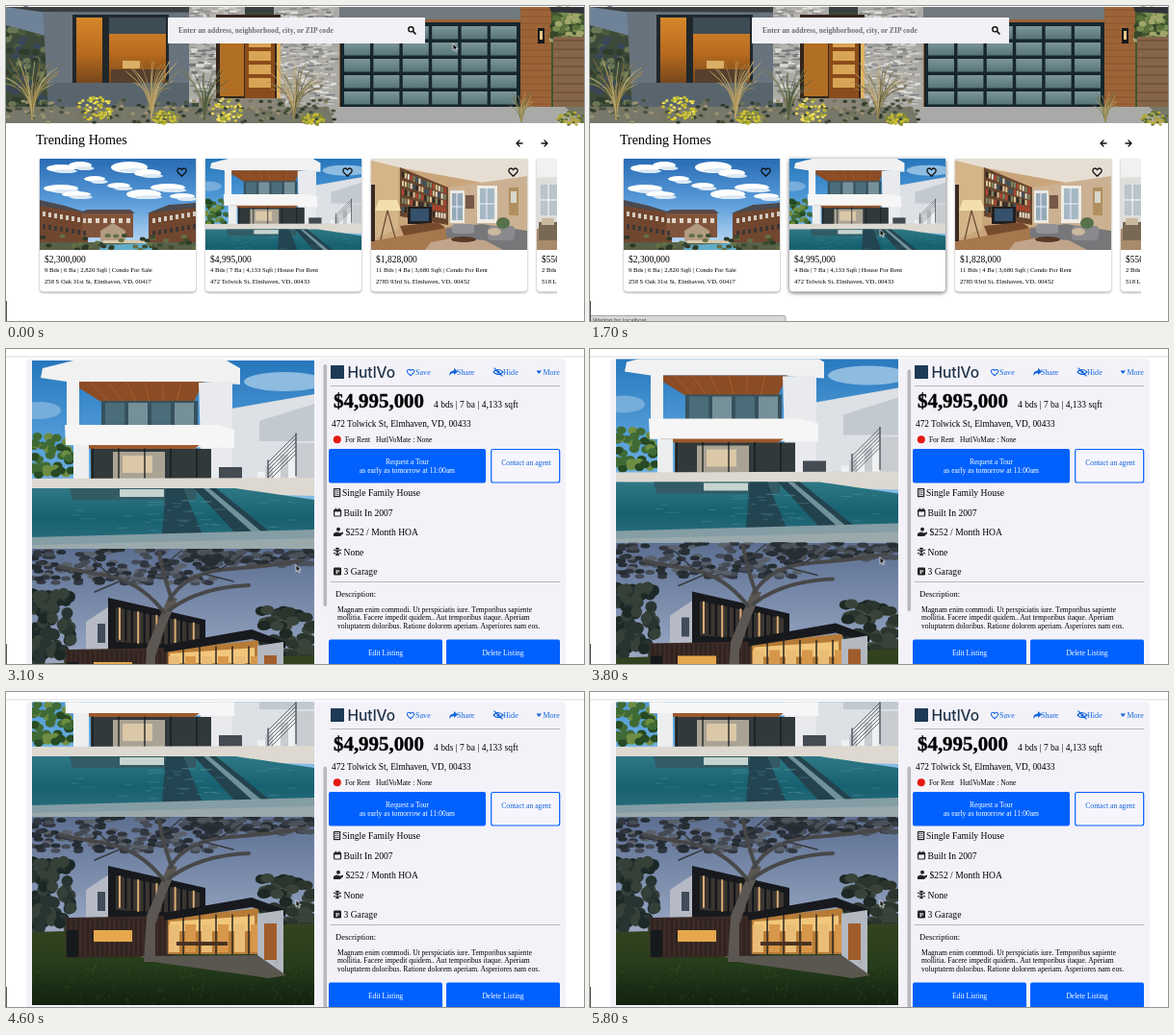
Write an HTML page that moves like this. It is 600 px wide and 328 px high and loops after 5.9 s.

```html
<!DOCTYPE html>
<html lang="en">
<head>
<meta charset="utf-8">
<title>Home listings</title>
<style>
html, body { margin: 0; width: 100%; height: 100%; overflow: hidden; background: #fff; }
svg { display: block; width: 100vw; height: 100vh; font-family: "Liberation Serif", Times, serif; }
.card { filter: drop-shadow(0 1px 1.2px #0006); }
.card.hover { filter: drop-shadow(0 1.5px 2.2px #000a); }
</style>
</head>
<body>
<svg id="stage" viewBox="0 0 600 328"></svg>
<script>
const rect = (x, y, w, h, fill, more = '') =>
  `<rect x="${x}" y="${y}" width="${w}" height="${h}" fill="${fill}" ${more}/>`;
const poly = (points, fill) => `<polygon points="${points}" fill="${fill}"/>`;
const oval = (x, y, rx, ry, fill) => `<ellipse cx="${x}" cy="${y}" rx="${rx}" ry="${ry}" fill="${fill}"/>`;
const line = (d, color, width = 1) =>
  `<path d="${d}" fill="none" stroke="${color}" stroke-width="${width}" stroke-linecap="round" stroke-linejoin="round"/>`;
const text = (x, y, size, s, more = '') => `<text x="${x}" y="${y}" font-size="${size}" ${more}>${s}</text>`;
const at = (x, y, body, scale = 1) => `<g transform="translate(${x} ${y}) scale(${scale})">${body}</g>`;
const many = (n, f) => Array.from({ length: n }, (_, i) => f(i)).join('');
const fade = (id, ...stops) => `<linearGradient id="${id}" x2="0" y2="1">` +
  stops.map((c, i) => `<stop offset="${i / (stops.length - 1)}" stop-color="${c}"/>`).join('') + '</linearGradient>';
const clip = (id, x, y, w, h) => `<clipPath id="${id}">${rect(x, y, w, h, '#000')}</clipPath>`;

let seed = 7;
const rnd = (a, b) => {
  seed = (seed * 16807) % 2147483647;
  return +(a + (b - a) * seed / 2147483647).toFixed(1);
};
const pick = list => list[Math.floor(rnd(0, list.length - 0.06))];

const heart = color => line('M0 4.2L-4 .2C-6.2-3-2.2-5.6 0-2.4 2.2-5.6 6.2-3 4 .2Z', color, 1.3);
const grass = (x, y, h, n, colors) => many(n, () =>
  line(`M${x} ${y}q${rnd(-4, 4)} ${-h / 2} ${rnd(-h / 2, h / 2)} ${-rnd(h / 2, h)}`, pick(colors), 0.7));
const bush = (x, y, w, h, colors) => many(60, () => {
  const a = rnd(0, 6.3), r = Math.sqrt(rnd(0, 1));
  return oval((x + w * r * Math.cos(a)).toFixed(1), (y + h * r * Math.sin(a)).toFixed(1), 1.7, 1.3, pick(colors));
});
const stone = (x, y, w, h) => rect(x, y, w, h, '#aaa9a4') + many(Math.round(w * h / 16), () =>
  rect(rnd(x, x + w - 9), rnd(y, y + h - 3), rnd(4, 9), rnd(1, 2.6), pick(['#c9c8c4', '#8d8d8a', '#dddcd8', '#74777a', '#b8b5ad'])));

function hero() {
  const garage = rect(347, 17, 187, 88, '#17252c') + many(30, i =>
    rect(351 + (i % 6) * 30.4, 21 + Math.floor(i / 6) * 17, 27, 13.5, 'url(#frost)'));
  return rect(0, 1, 600, 121, '#3c4a3a') +
    many(80, () => oval(rnd(0, 42), rnd(3, 110), 4, 3, pick(['#2f3d2c', '#4c5b3f', '#697653', '#38465a']))) +
    poly('0,1 45,1 45,32 0,20', '#6e8397') +
    poly('38,1 192,1 192,108 44,108', '#68737d') + poly('0,1 345,1 345,7 36,6', '#3b3e40') +
    rect(69, 9, 100, 79, '#20272b') +
    rect(73, 12, 27, 72, 'url(#warm)') + rect(107, 12, 59, 72, 'url(#warm)') +
    rect(107, 12, 59, 17, '#3e4c55') + rect(109, 66, 55, 18, '#55402d') + rect(121, 57, 18, 8, '#dcae66') +
    rect(43, 80, 150, 28, '#59656d') + stone(190, 1, 58, 100) + stone(278, 1, 68, 104) +
    rect(218, 9, 67, 87, '#33261c') + rect(222, 12, 25, 82, '#b16f25') + rect(248, 12, 31, 84, '#8a4c1b') +
    many(5, i => rect(252, 19 + i * 14, 23, 10, '#d8a456')) + rect(281, 12, 4, 84, '#e1b366') +
    rect(346, 1, 220, 106, '#9b6337') + many(15, i => line(`M346 ${4 + i * 7}H566`, '#7c4924', 0.6)) +
    rect(346, 1, 188, 13, '#70797e') + garage +
    rect(552, 23, 7, 16, '#16191b') + rect(554, 26, 3, 9, '#e8c98e') +
    rect(566, 1, 34, 121, '#42552e') +
    many(60, () => oval(rnd(567, 600), rnd(2, 35), 4, 3, pick(['#587039', '#344729', '#768c50', '#a0a76b']))) +
    poly('564,1 600,1 600,8 566,6', '#303237') + rect(568, 32, 32, 74, '#856548') +
    many(8, i => line(`M568 ${36 + i * 9}H600`, '#63482f')) +
    poly('0,105 600,105 600,122 0,122', '#777869') + poly('335,105 580,105 600,122 340,122', '#a9aaa8') +
    rect(200, 96, 90, 12, '#8b8478') +
    many(190, () => oval(rnd(0, 345), rnd(98, 121), 2.5, 1.6, pick(['#46513b', '#73745a', '#9a9171', '#303b2e']))) +
    grass(27, 118, 64, 34, ['#b59c5e', '#806f41', '#c8b77a']) +
    grass(151, 116, 60, 28, ['#a88f54', '#c5ae70']) + grass(206, 118, 52, 24, ['#485940', '#827c4e']) +
    grass(299, 119, 60, 36, ['#a38d58', '#665f3b', '#c4b27d']) + grass(535, 120, 30, 20, ['#b19b62', '#76743f']) +
    bush(93, 107, 19, 13, ['#d8c62d', '#aeb02f', '#eedf5c']) + bush(230, 109, 16, 13, ['#d7c62e', '#a3a435', '#eee064']) +
    bush(166, 116, 14, 7, ['#d0c33a', '#8a9334']) + bush(319, 118, 12, 6, ['#c7bb35', '#858c34']) +
    bush(587, 117, 14, 7, ['#596b32', '#b5a843']);
}

// Photo scenes, each drawn from its own top left corner
const condo = () => rect(0, 0, 162, 95, 'url(#sky)') +
  [[22, 10, 15, 4], [42, 7, 12, 4], [93, 9, 19, 6], [112, 15, 14, 4], [57, 21, 11, 3], [22, 31, 18, 4], [38, 37, 15, 3],
   [108, 37, 18, 5], [133, 30, 18, 4], [82, 28, 12, 3], [148, 39, 13, 3]].map(c => oval(...c, '#fff') + oval(c[0] + 5, c[1] + 3, c[2] * .8, 2, '#dce8f4')).join('') +
  poly('0,44 24,50 50,57 50,88 0,95', '#71462f') + poly('162,46 133,51 113,57 113,88 162,95', '#71462f') +
  rect(44, 56, 53, 26, '#80543b') + poly('40,57 49,53 94,53 99,57', '#57494a') +
  poly('0,43 26,49 52,57 0,49', '#4b4a50') + poly('162,46 134,48 111,57 162,51', '#4b4a50') +
  many(8, i => rect(3 + i * 6, 55 + i, 3, 5, '#d3cbc1') + rect(3 + i * 6, 68 + i, 3, 5, '#3d3735')) +
  many(8, i => rect(117 + i * 6, 62 - i, 3, 5, '#d3cbc1') + rect(117 + i * 6, 75 - i, 3, 5, '#3d3735')) +
  many(6, i => rect(50 + i * 8, 62, 4, 5, '#ded5c9')) +
  rect(0, 87, 162, 8, '#586148') + poly('63,75 76,67 89,75 89,86 63,86', '#b29b80') +
  rect(66, 85, 46, 3, '#d8c8ae') + poly('64,90 110,88 119,95 62,95', '#62aeca') +
  many(40, () => oval(rnd(0, 162), rnd(80, 95), 3, 2, pick(['#3d4b2e', '#617044', '#2d3929'])));

const villa = () => rect(0, 0, 293, 196, 'url(#deep)') +
  oval(262, 22, 42, 10, '#8dbce0') + oval(8, 52, 22, 9, '#77addb') +
  many(45, () => oval(rnd(0, 42), rnd(78, 122), 5, 4, pick(['#274a24', '#406a35', '#6e8d42']))) +
  poly('190,53 293,35 293,134 190,134', '#dde0e4') + poly('236,63 293,45 293,84 236,84', '#c2c9d1') +
  poly('11,8 43,0 202,0 216,8 216,25 174,22 36,22 9,18', '#f1f1f2') +
  poly('38,22 178,22 168,43 72,43', '#8c4c25') + many(6, i => line(`M${60 + i * 19} 22L${80 + i * 14} 43`, '#b36b36', 0.6)) +
  rect(36, 20, 13, 68, '#f2f2f3') + rect(72, 42, 100, 29, '#36515d') +
  many(4, i => rect(76 + i * 24, 44, 20, 26, i % 2 ? '#759098' : '#4b6c79')) +
  poly('173,23 208,22 208,132 176,126', '#e8eaed') +
  poly('34,67 191,67 210,72 210,91 35,88', '#f6f6f6') + poly('46,88 174,88 164,95 72,95', '#9c592c') +
  rect(61, 92, 125, 33, '#32393a') + rect(84, 95, 54, 28, '#aaa394') + rect(94, 99, 31, 18, '#dbc8a7') +
  many(5, i => line(`M${63 + i * 27} 92V124`, '#141a1d', 1.3)) + rect(43, 88, 16, 39, '#eceef0') +
  rect(194, 111, 24, 16, '#444b52') + many(8, i => poly(`${218 + i * 8},${128 - i * 6} 293,${128 - i * 6} 293,133 ${218 + i * 8},133`, i % 2 ? '#c8ccd0' : '#eff0f1')) +
  many(6, i => line(`M245 ${106 + i * 4}L274 ${77 + i * 4}`, '#464d55', 0.8)) + line('M245 104V130M274 76V120', '#464d55', 1.3) +
  poly('0,123 293,122 293,141 0,133', '#ddd9d1') +
  poly('0,133 211,133 293,145 293,196 0,196', 'url(#pool)') +
  poly('39,133 171,133 170,145 42,145', '#335b65') + rect(91, 134, 46, 8, '#c5d4cf') +
  poly('139,133 157,133 177,181 134,191', '#234451') + poly('168,133 191,133 254,184 215,184', '#23424d') +
  poly('178,133 184,133 245,184 235,184', '#6f929a') +
  many(35, () => line(`M${rnd(4, 270)} ${rnd(145, 180)}h${rnd(4, 15)}`, '#69a9b170', 0.7)) +
  poly('0,184 293,176 293,196 0,196', '#859da4') + poly('0,192 293,185 293,196 0,196', '#9aa9ac');

const dusk = () => rect(0, 0, 293, 196, 'url(#dusk)') +
  many(180, () => oval(rnd(0, 190), rnd(0, 36), 5, 2.5, pick(['#313640', '#454b55', '#252d32', '#5a606a']))) +
  many(80, () => oval(rnd(160, 293), rnd(0, 17), 6, 3, pick(['#353b43', '#4b515a', '#272e33']))) +
  many(90, () => oval(rnd(0, 42), rnd(45, 125), 6, 6, pick(['#1c2826', '#283431', '#354039']))) +
  many(80, () => oval(rnd(238, 293), rnd(64, 135), 7, 5, pick(['#1d2824', '#2b352e', '#394339']))) +
  poly('0,120 293,111 293,196 0,196', 'url(#lawn)') +
  poly('56,76 80,60 80,108 56,108', '#b5bac5') + rect(68, 78, 8, 20, '#424d5b') +
  poly('79,51 180,74 180,111 79,106', '#17191d') + poly('87,61 174,79 174,101 87,97', '#3b3530') +
  many(13, i => line(`M${91 + i * 6.4} ${62 + i * 1.3}v32`, i % 3 ? '#111419' : '#d9ad77', 2)) +
  poly('35,105 147,103 147,145 35,147', '#3b2a25') + many(22, i => line(`M${38 + i * 5} 106v39`, '#201b1b')) +
  rect(64, 118, 40, 12, '#e6a84d') + rect(36, 118, 12, 28, '#14191b') +
  poly('139,105 235,95 235,143 139,143', '#b67b37') + poly('143,109 231,103 231,119 143,119', '#f1c77b') +
  many(6, i => rect(142 + i * 17, 112, 11, 29, i % 2 ? '#d7974a' : '#e9bd76') + line(`M${140 + i * 17} 102V143`, '#292522', 1.5)) +
  rect(150, 130, 53, 4, '#493223') + poly('137,100 228,84 263,97 263,104 228,94 137,108', '#17191d') +
  poly('234,101 261,97 261,164 234,148', '#b4b8c1') + rect(241, 111, 13, 38, '#a05d2b') +
  poly('112,145 234,144 264,165 246,168 126,151', '#5a5650') +
  poly('116,151 119,103 132,72 142,49 151,52 139,80 128,112 128,151', '#5c5752') +
  line('M137 66Q112 34 78 28T30 19M143 53Q160 24 205 21T280 12M145 52Q135 24 132 4M142 64Q174 40 225 38', '#484849', 4) +
  line('M93 33L65 45M82 29L61 9M193 23L218 7M178 26L209 34M133 21L155 2', '#363b3f', 1.6) +
  many(130, () => line(`M${rnd(0, 293)} ${rnd(151, 195)}l1-2`, '#4b6a2b80', 0.7));

const loft = () => rect(0, 0, 162, 95, '#caa57b') + poly('0,0 162,0 162,19 116,25 28,9 0,2', '#e6ded3') +
  poly('0,2 28,9 28,73 0,85', '#d4b58a') + poly('80,30 162,18 162,75 80,69', '#cbb191') +
  poly('30,9 80,30 80,69 30,60', '#67452e') +
  many(5, r => many(16, i => rect(32 + i * 2.9, 14 + r * 9 + i * (1.1 - r * .16), 2, 5.5, pick(['#b84532', '#d9c594', '#385568', '#7c8b66', '#e7e0cc', '#2c2827'])))) +
  rect(38, 50, 25, 18, '#221f21') + poly('30,70 69,66 76,71 76,83 37,88', '#774b2d') + rect(41, 52, 19, 13, '#35516b') +
  rect(82, 33, 15, 34, '#e9e9e4') + rect(84, 36, 11, 28, '#94a9b7') + rect(110, 28, 21, 39, '#eeece5') + rect(113, 31, 15, 32, '#a6b9c3') +
  line('M89 36V64M120 31V63M84 50H95M113 47H128', '#eef', 1) + rect(98, 38, 9, 14, '#76584a') + rect(143, 30, 10, 29, '#b18f61') + rect(145, 34, 6, 12, '#d8d9cd') +
  poly('0,86 79,72 162,76 162,95 0,95', '#a5784e') + poly('62,87 110,78 146,95 56,95', '#c2a48b') +
  poly('8,43 27,43 31,54 4,54', '#f3dfae') + line('M17 54L10 84M17 54L25 82', '#694b31', 1.2) +
  poly('78,72 115,68 162,75 162,95 137,95 118,85 78,82', '#77777a') + rect(84, 68, 23, 10, '#929195', 'rx="3"') + rect(121, 70, 28, 15, '#8a898d', 'rx="4"') +
  oval(128, 76, 7, 4, '#cab8a0') + oval(96, 84, 13, 3, '#563a29') + oval(137, 67, 7, 6, '#56714b') + rect(0, 27, 4, 59, '#3a2a23');

const bright = () => rect(0, 0, 162, 95, '#dedddb') + poly('0,0 162,0 162,12 0,20', '#f2f1ef') + rect(4, 27, 17, 32, '#b9c5ca') +
  line('M12 27V59M4 43H21', '#fff', 1) + poly('0,73 162,65 162,95 0,95', '#a98b6a') + rect(2, 66, 27, 19, '#776956') + rect(5, 62, 13, 7, '#c9b99d');

const homes = [
  [condo, '$2,300,000', '9 Bds | 6 Ba | 2,820 Sqft | Condo For Sale', '258 S Oak 31st St, Elmhaven, VD, 00417'],
  [villa, '$4,995,000', '4 Bds | 7 Ba | 4,133 Sqft | House For Rent', '472 Tolwick St, Elmhaven, VD, 00433'],
  [loft, '$1,828,000', '11 Bds | 4 Ba | 3,680 Sqft | Condo For Rent', '2785 93rd St, Elmhaven, VD, 00452'],
  [bright, '$550,000', '2 Bds | 1 Ba | 940 Sqft | Condo For Sale', '518 Loder St, Elmhaven, VD, 00468']
];

const card = ([photo, price, facts, address], i) => at(35 + i * 172, 159,
  `<g class="card">${rect(0, 0, 162, 138.5, '#fff', 'rx="4"')}` +
  `<g clip-path="url(#photo)">${at(0, 0, photo(), photo === villa ? 162 / 293 : 1)}</g>` +
  at(147.5, 14, heart('#111')) + text(5, 108, 9.5, price) + text(5, 118, 6.7, facts) + text(5, 129.5, 6.65, address) + '</g>');

const arrow = 'M3 0H-3M0-3L-3 0 0 3';
const home = () => hero() + rect(168, 12, 267, 27, '#f1f0f5') +
  text(179, 28, 7.6, 'Enter an address, neighborhood, city, or ZIP code', 'font-weight="700" fill="#6d6d72"') +
  '<circle cx="420.4" cy="24.3" r="2.6" fill="none" stroke="#111" stroke-width="1.4"/>' + line('M422.5 26.4L425 29', '#111', 1.7) +
  text(31, 143.5, 14.1, 'Trending Homes') +
  at(533, 143, line(arrow, '#111', 1.3)) + at(559, 143, line(arrow, '#111', 1.3), '-1 1') +
  `<g clip-path="url(#row)">${homes.map(card).join('')}</g>` +
  `<g id="status">${rect(-2, 322.5, 205, 12, '#d9d9dc', 'stroke="#a5a5a8" rx="1.5"')}` +
  text(3, 329, 6.2, 'Waiting for localhost...', 'fill="#444" font-family="Liberation Sans, Arial, sans-serif"') + '</g>';

const blue = '#0061ff', link = '#1264dc', mid = 'text-anchor="middle"';
const icons = () => {
  const ink = '#222';
  return at(340, 145, rect(.6, .6, 6, 8, 'none', `stroke="${ink}" stroke-width="1.2"`) + many(6, i => rect(2 + (i % 2) * 2, 2 + Math.floor(i / 2) * 2, 1.2, 1.2, ink))) +
    at(340, 166, rect(.6, 1.4, 7, 6.6, 'none', `stroke="${ink}" stroke-width="1.2" rx="1"`) + rect(.6, 1.4, 7, 2, ink) + line('M2.3 0V2M6 0V2', ink)) +
    at(340, 186, oval(5, 1.8, 2, 2, ink) + poly('0,6 3,4.5 7,5.5 10,4.5 10,6 7,9 0,9', ink)) +
    at(344, 211, line('M0-4V4M-3.6-2L3.6 2M-3.6 2L3.6-2M-1.5-3.5L0-2 1.5-3.5M-1.5 3.5L0 2 1.5 3.5', ink, 1.1)) +
    rect(340, 227.5, 8, 8, ink, 'rx="1.2"') + text(344, 234.3, 6.8, 'P', `fill="#fff" font-weight="700" ${mid}`);
};

const detail = () => line('M0 8H600', '#dcdce1') + rect(21, 10, 560, 330, '#f4f2f9', 'rx="5"') +
  `<g clip-path="url(#gallery)"><g id="photos"><g clip-path="url(#big)">${villa()}</g>` +
  at(0, 196, `<g clip-path="url(#big)">${dusk()}</g>`) + '</g></g>' +
  rect(329.5, 0, 3.6, 252, '#b9b8bd', 'id="thumb" rx="1.8"') +
  rect(337, 17, 14, 14, '#1d3a55') +
  text(354.5, 29.8, 15.5, 'HutlVo', 'font-family="Inter, sans-serif" font-weight="500" fill="#1d3147"') +
  at(420, 24.4, heart(link), .8) +
  at(460, 20, poly('0,8 1,4 5,2.2 5,0 9,3.6 5,7 5,5 2.5,5.5', link)) +
  at(506, 20, line('M0 4Q5-1 10 4 5 9 0 4M1 0L9 8', link, 1.1) + oval(5, 4, 1.6, 1.6, link)) +
  poly('550.5,22.5 556,22.5 553.2,26', link) +
  `<g fill="${link}">${text(425, 27, 8.1, 'Save') + text(468, 27, 8.1, 'Share') + text(516, 27, 8.1, 'Hide') + text(557.5, 27, 8, 'More')}</g>` +
  line('M337 38.5H575M337 242.5H575', '#a9a8ae', .8) +
  text(340, 60.5, 20.9, '$4,995,000', 'font-weight="700" stroke="#000" stroke-width=".35"') +
  text(444, 60.5, 9.5, '4 bds | 7 ba | 4,133 sqft') + text(338, 81, 9.3, '472 Tolwick St, Elmhaven, VD, 00433') +
  oval(343.8, 94.3, 4, 4, '#e51912') + text(352, 97, 7.4, 'For Rent') + text(384, 97, 7.4, 'HutlVoMate : None') +
  rect(335, 104, 163, 35.5, blue, 'rx="2"') + rect(503.7, 104.5, 71, 34.5, '#f6f5fc', `rx="2" stroke="${blue}" stroke-width="1.2"`) +
  `<g fill="#fff" ${mid}>${text(416.5, 119.6, 7.5, 'Request a Tour') + text(416.5, 128.6, 7.6, 'as early as tomorrow at 11:00am')}</g>` +
  text(540, 121, 7.7, 'Contact an agent', `fill="${link}" ${mid}`) + icons() +
  [[349, 'Single Family House'], [350.5, 'Built In 2007'], [352.5, '$252 / Month HOA'], [350.5, 'None'], [350.5, '3 Garage']]
    .map(([x, s], i) => text(x, 153.3 + i * 20.4, 9.6, s)).join('') +
  text(342, 258, 8.5, 'Description:') +
  ['Magnam enim commodi. Ut perspiciatis iure. Temporibus sapiente', 'mollitia. Facere impedit quidem.. Aut temporibus itaque. Aperiam',
   'voluptatem doloribus. Ratione dolorem aperiam. Asperiores nam eos.'].map((s, i) => text(344, 273.6 + i * 8.7, 7.57, s)).join('') +
  rect(335, 302.5, 118, 30, blue, 'rx="2"') + rect(457, 302.5, 118, 30, blue, 'rx="2"') +
  `<g fill="#fff" ${mid}>${text(394, 319, 7.6, 'Edit Listing') + text(516, 319, 7.6, 'Delete Listing')}</g>`;

const $ = id => document.getElementById(id);
$('stage').innerHTML = '<defs>' +
  fade('sky', '#286cb5', '#5d9edb', '#c6dff3') + fade('deep', '#2677bd', '#5ba3dc', '#b4d9f0') +
  fade('pool', '#2f7886', '#17606f', '#2e7180') + fade('dusk', '#5c6f91', '#8d9dbb', '#d1c9cf') +
  fade('lawn', '#34431f', '#263d1c', '#11210f') + fade('warm', '#d6872c', '#b96c1e', '#70431c') + fade('frost', '#7c9699', '#577478') +
  clip('photo', 0, 0, 162, 95) + clip('row', 25, 150, 547, 165) + clip('big', 0, 0, 293, 196) + clip('gallery', 27, 10.5, 293, 318) + '</defs>' +
  rect(0, 0, 600, 328, '#fff') + `<g id="home">${home()}</g><g id="detail">${detail()}</g>` +
  rect(0, 307, 1, 21, '#55555a') +
  '<path id="cursor" d="M0 0V7.2L1.7 5.7 2.9 8.4 4.1 7.9 2.9 5.3H5.2Z" fill="#111" stroke="#fff" stroke-width=".7"/>';

const hovered = document.querySelectorAll('.card')[1];
const show = (id, on) => $(id).setAttribute('display', on ? 'inline' : 'none');
const ease = (t, from, to) => {
  const p = Math.min(1, Math.max(0, (t - from) / (to - from)));
  return p * p * (3 - 2 * p);
};

function draw(now) {
  const t = now % 5900, opened = t >= 2700;
  const move = ease(t, 100, 650), scroll = 78 * ease(t, 3650, 4500);
  show('home', !opened);
  show('detail', opened);
  show('status', t >= 1500 && t < 2100);
  hovered.classList.toggle('hover', t >= 500);
  $('cursor').setAttribute('transform', `translate(${464 - 163 * move} ${39 + 193.5 * move - 16 * ease(t, 2900, 3300)})`);
  $('photos').setAttribute('transform', `translate(27 ${12 - scroll})`);
  $('thumb').setAttribute('y', 16 + scroll * 0.79);
}

const start = performance.now();
function tick() {
  draw(performance.now() - start);
  requestAnimationFrame(tick);
}
draw(0);
requestAnimationFrame(tick);
</script>
</body>
</html>
```
